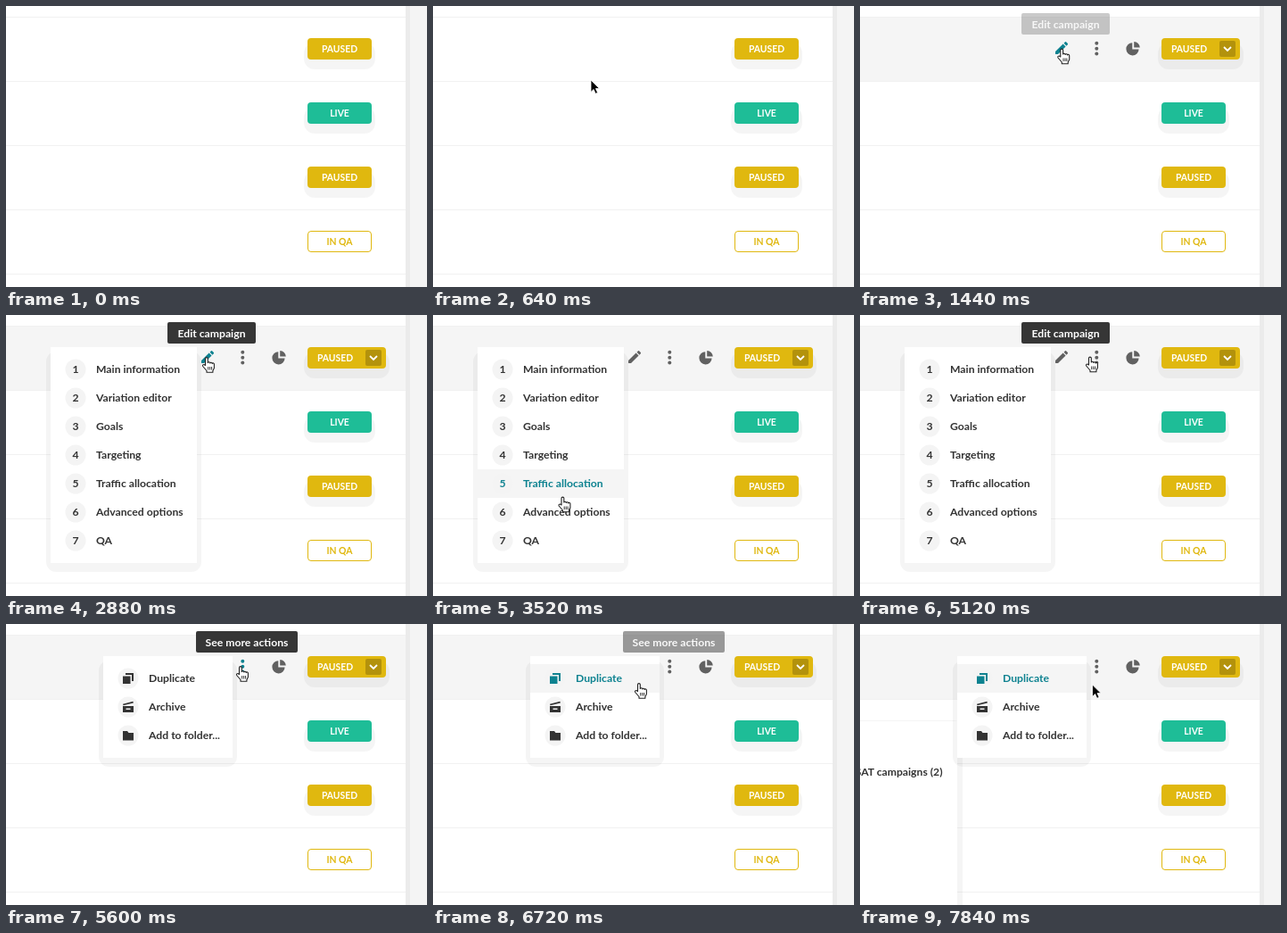
Animation of 472 by 315 pixels, one loop 8000 ms. Source, as an HTML page:

```html
<!DOCTYPE html>
<html lang="en">
<head>
<meta charset="utf-8">
<title>Campaign list</title>
<style>
  html, body { margin: 0; width: 100%; height: 100%; overflow: hidden; background: #fff; }
  svg { display: block; width: 472px; height: 315px; }
  text { font: 700 12.2px Lato, sans-serif; fill: #333; }
  .mid { text-anchor: middle; }
  .badge text { font-size: 10.4px; text-anchor: middle; fill: #fff; }
  .shadow { fill: #000; fill-opacity: .04; filter: url(#soft); }
  .gold { fill: #e0b80f; }
  .icon { fill: #616161; }
  .on, .item.on text { fill: #0d8290; }
  .dot { fill: #f4f4f4; }
  .band { fill: none; }
  .item.on .band { fill: #f5f5f5; }
  .glyph { fill: #333; stroke: none; }
  .item.on .glyph { fill: #0d8290; }
  .tip text { fill: #fff; }
</style>
</head>
<body>
<svg viewBox="0 0 472 315">
  <defs>
    <filter id="soft" x="-20%" y="-20%" width="140%" height="140%"><feGaussianBlur stdDeviation=".7"/></filter>
  </defs>

  <rect width="472" height="315" fill="#fff"/>
  <rect id="rowBg" y="12" width="448" height="72" fill="#f5f5f5"/>
  <g id="lines" fill="#f1f1f1"></g>
  <rect x="448" width="5" height="315" fill="#ebebeb"/>
  <rect x="453" width="19" height="315" fill="#f4f4f4"/>
  <g id="badges"></g>

  <g id="tools">
    <g class="badge">
      <rect class="shadow" x="334" y="41" width="96" height="30" rx="12"/>
      <rect class="gold" x="338" y="36" width="88" height="24" rx="4"/>
      <text x="369" y="51.8">PAUSED</text>
      <rect x="403" y="39" width="18" height="18" rx="2" fill="#b3920c"/>
      <path d="M408 46l4 4 4-4" fill="none" stroke="#fff" stroke-width="1.8"/>
    </g>
    <path id="pencil" class="icon" transform="translate(216.7 37.7) scale(.78)"
      d="M3 17.2V21h3.8L17.8 9.9l-3.8-3.7zM20.7 7a1 1 0 0 0 0-1.4L18.4 3.300a1 1 0 0 0-1.400 0l-1.800 1.800 3.700 3.800z"/>
    <g id="dots" class="icon">
      <circle cx="265.300" cy="41.800" r="2"/><circle cx="265.300" cy="47.700" r="2"/><circle cx="265.300" cy="53.600" r="2"/>
    </g>
    <path class="icon" d="M305.300 41.200V48.500H312.600A7.100 7.100 0 1 1 305.300 41.200zM307.200 40A6.800 6.800 0 0 1 313.800 46.600H307.200z"/>
  </g>

  <g id="panel">
    <rect class="shadow" x="-30" y="108" width="145" height="240" rx="10"/>
    <rect x="-10" y="109" width="119" height="220" fill="#fff"/>
    <text x="92.500" y="170" text-anchor="end">SAT campaigns (2)</text>
  </g>
  <g id="editMenu"></g>
  <g id="moreMenu"></g>

  <g id="editTip" class="tip">
    <rect x="181" y="8" width="99" height="24" rx="2" fill="#363636"/>
    <text class="mid" x="230.500" y="24.600">Edit campaign</text>
  </g>
  <g id="moreTip" class="tip">
    <rect x="213" y="8" width="114" height="24" rx="2" fill="#363636"/>
    <text class="mid" x="270" y="24.600">See more actions</text>
  </g>

  <g id="cursor">
    <path id="arrow" d="M0 0V13.400L3.100 10.500 5.200 15.300 7.600 14.300 5.500 9.600H9.600z" fill="#000" stroke="#fff" stroke-width=".8"/>
    <g id="hand" stroke="#222" stroke-width="1.100" stroke-linejoin="round">
      <path fill="#fff" d="M-1.500 9V1.500a1.400 1.400 0 0 1 2.800 0V6a1.300 1.300 0 0 1 2.500.4 1.300 1.300 0 0 1 2.400.6 1.200 1.200 0 0 1 2.200.8V12l-1.500 3v1.700H0V15l-4.300-5a1.300 1.300 0 0 1 1.800-1.800z"/>
      <path fill="none" stroke-width=".9" d="M1.700 10.500v3.500M3.700 10.500v3.500M5.600 10.500v3.500"/>
    </g>
  </g>
</svg>

<script>
const $ = id => document.getElementById(id);
const LOOP = 8000, STEP = 160, ROW = 32, TOP = 45;

$('lines').innerHTML = [12, 84, 156, 228, 300]
  .map(y => `<rect y="${y}" width="448" height="1"/>`).join('');

const badge = (label, y, color, id = '') => `<g class="badge" id="${id}">
  <rect class="shadow" x="334" y="${y + 5}" width="80" height="30" rx="12"/>
  <rect x="338" y="${y}" width="72" height="24" rx="4" fill="${color}"/>
  <text x="374" y="${y + 15.8}">${label}</text></g>`;

$('badges').innerHTML =
  badge('PAUSED', 36, '#e0b80f', 'plain') +
  badge('LIVE', 108, '#1ebd97') +
  badge('PAUSED', 180, '#e0b80f') +
  `<g class="badge"><rect x="338.5" y="252.5" width="71" height="23" rx="3.5" fill="#fff" stroke="#e0b80f"/>
   <text x="374" y="267.8" style="fill:#e0b80f">IN QA</text></g>`;

// Menu with one badge and label per item; marks are drawn around the badge centre.
function buildMenu(el, x, w, cx, tx, items) {
  const h = items.length * ROW + 18;
  el.innerHTML =
    `<rect class="shadow" x="${x - 5}" y="41" width="${w + 10}" height="${h + 5}" rx="11"/>
     <rect x="${x}" y="36" width="${w}" height="${h}" fill="#fff"/>` +
    items.map(([label, mark], i) => `<g class="item" transform="translate(0 ${TOP + i * ROW})">
      <rect class="band" x="${x}" width="${w}" height="${ROW}"/>
      <circle class="dot" cx="${cx}" cy="16" r="11.5"/>
      <g transform="translate(${cx} 16)">${mark}</g>
      <text x="${tx}" y="20.2">${label}</text></g>`).join('');
}

const glyph = d => `<path class="glyph" fill-rule="evenodd" d="${d}"/>`;

buildMenu($('editMenu'), 50, 164, 78, 101,
  ['Main information', 'Variation editor', 'Goals', 'Targeting',
   'Traffic allocation', 'Advanced options', 'QA']
    .map((s, i) => [s, `<text class="mid" y="4.2">${i + 1}</text>`]));

buildMenu($('moreMenu'), 109, 145, 137, 160, [
  ['Duplicate', glyph('M-6 -2.500H2.500V6H-6zM-3 -6H6V3H4V-4H-3z')],
  ['Archive', glyph('M-6 -1H6V6H-6zM-2.500 1.500V3H2.500V1.500zM-6 -3.300L5.400 -6.300 5.900 -4.400 -5.500 -1.700z')],
  ['Add to folder...', glyph('M-6 -5H-1L.5 -3H6V5.500H-6z')]
]);

// Pointer tip: time, x, y.
const path = [
  [160, 356, 300], [320, 275, 200], [480, 165, 73], [640, 177, 83],
  [960, 192, 74], [1120, 212, 60], [1280, 225, 50], [1440, 226.3, 48],
  [2880, 225, 47.5], [3040, 206, 76], [3200, 185, 116], [3360, 165, 162],
  [3520, 145.500, 204], [3680, 141, 232], [3840, 140, 249],
  [4160, 150, 225], [4320, 170, 170], [4480, 198, 100], [4640, 224, 54],
  [4800, 228, 49], [4960, 241, 47], [5120, 258, 47], [5280, 263, 47.500],
  [6720, 231, 66.500], [6880, 224, 116], [7040, 220, 126],
  [7680, 238, 74], [7840, 260.500, 68]
];

// Linear ramp from 0 at a to 1 at b.
const ramp = (t, a, b) => Math.min(1, Math.max(0, (t - a) / (b - a)));
const show = (id, on) => { $(id).style.display = on ? '' : 'none'; };
const fade = (id, o) => { show(id, o > 0); $(id).style.opacity = o; };

function hover(id, row) {
  $(id).querySelectorAll('.item').forEach((el, i) => el.classList.toggle('on', i === row));
}

function draw(now) {
  const t = Math.floor(now % LOOP / STEP) * STEP;
  const [, x, y] = path.filter(p => p[0] <= t).pop() || [0, -50, -50];
  const active = t >= 960;
  const hand = t >= 1280 && t < 7840;
  const row = Math.floor((y - TOP) / ROW);

  show('rowBg', active);
  show('tools', active);
  show('plain', !active);
  show('editMenu', t >= 2240 && t < 5280);
  show('moreMenu', t >= 5440);
  show('panel', t >= 7040);
  hover('editMenu', x < 214 ? row : -1);
  hover('moreMenu', x < 262 ? row : -1);

  $('pencil').classList.toggle('on', hand && x > 214 && x < 234 && y < 56);
  $('dots').classList.toggle('on', hand && x > 260);

  fade('editTip', t < 4000
    ? ramp(t, 1330, 1755) * (1 - ramp(t, 2880, 3200))
    : ramp(t, 4640, 4960) * (1 - ramp(t, 5120, 5440)));
  fade('moreTip', ramp(t, 5200, 5600) * (1 - ramp(t, 6560, 6870)));

  show('arrow', !hand);
  show('hand', hand);
  $('cursor').setAttribute('transform', `translate(${x} ${y})`);
}

function tick() {
  draw(performance.now());
  requestAnimationFrame(tick);
}
tick();
</script>
</body>
</html>
```
